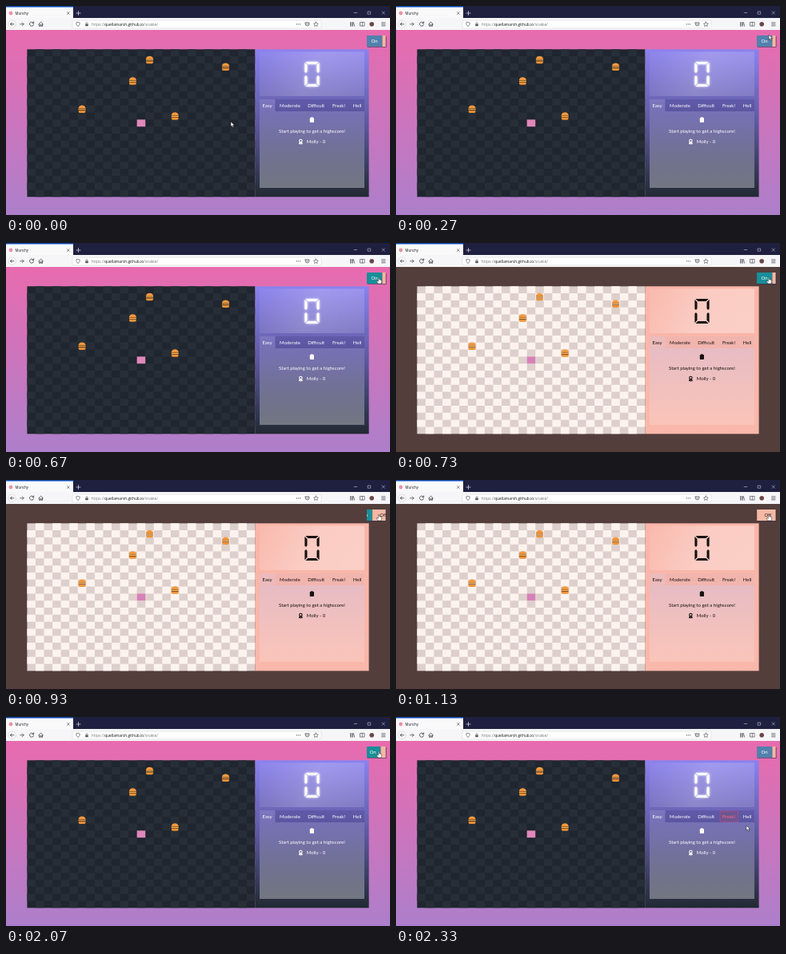
These frames come from a looping animation (480x262 px, 2390 ms). An HTML page:

```html
<!DOCTYPE html>
<html lang="en">
<head>
<meta charset="utf-8">
<title>Browser game theme toggle</title>
<style>
  html, body { margin: 0; width: 100%; height: 100%; overflow: hidden; background: #1f1f40; }
  svg { display: block; width: 100vw; height: 100vh; }
  .page { font: 6px Lato, sans-serif; }
  .chrome { font: 4.8px "Open Sans", "Noto Sans", sans-serif; }
  .tab { font-size: 4.4px; }
  .mid { text-anchor: middle; }
</style>
</head>
<body>
<svg id="stage" viewBox="0 0 480 262" preserveAspectRatio="none"></svg>
<script>
const LOOP = 2390, STEP = 1000 / 15;
const BOARD = { x: 26.4, y: 54.3, w: 285.1, h: 185, cols: 27, rows: 21 };
const CELL_W = BOARD.w / BOARD.cols, CELL_H = BOARD.h / BOARD.rows;
const FOOD = [[14, 1], [23, 2], [12, 4], [6, 8], [17, 9]];
const TABS = [['Easy', 326.5], ['Moderate', 355], ['Difficult', 387.7], ['Freak!', 416], ['Hell', 439]];

const THEMES = {
  dark: {
    page: ['#e86bae', '#ad7fcb'], cells: ['#1f262f', '#272e38'],
    panel: ['#8c82ee', '#5e599f', '#222933'], ink: '#fff', player: '#e087bb',
    score: ['#ffffff08', '#ffffff34', '#ffffff20'], content: ['#ffffff1c', '#ffffff58'],
    tabBar: '#46408a50', tabOn: '#ffffff1c'
  },
  light: {
    page: ['#533e3c', '#533e3c'], cells: ['#ddd0cc', '#fdf3ee'],
    panel: ['#f9b5a8', '#f9b6a9', '#f9b8ab'], ink: '#17110f', player: '#d681b8',
    score: ['#ffffff10', '#ffffff50', '#ffffff58'], content: ['#dfbfd0b0', '#fbcabfb0'],
    tabBar: '#eeb4b2a0', tabOn: '#e3bfcc90'
  }
};

const rect = (x, y, w, h, fill, extra = '') =>
  `<rect x="${x}" y="${y}" width="${w}" height="${h}" fill="${fill}" ${extra}/>`;
const path = (d, fill, extra = '') => `<path d="${d}" fill="${fill}" ${extra}/>`;
const line = (d, color, width = 0.8) =>
  path(d, 'none', `stroke="${color}" stroke-width="${width}" stroke-linecap="round" stroke-linejoin="round"`);
const dot = (x, y, r, fill) => `<circle cx="${x}" cy="${y}" r="${r}" fill="${fill}"/>`;
const text = (x, y, value, fill, extra = '') => `<text x="${x}" y="${y}" fill="${fill}" ${extra}>${value}</text>`;

function gradient(id, colors, [x1, y1, x2, y2]) {
  const stops = colors.map((c, i) => `<stop offset="${i / (colors.length - 1)}" stop-color="${c}"/>`);
  return `<linearGradient id="${id}" gradientUnits="userSpaceOnUse" x1="${x1}" y1="${y1}" x2="${x2}" y2="${y2}">${stops.join('')}</linearGradient>`;
}

function checker(fill) {
  let d = '';
  for (let row = 0; row < BOARD.rows; row++)
    for (let col = 1 - row % 2; col < BOARD.cols; col += 2)
      d += `M${(BOARD.x + col * CELL_W).toFixed(2)} ${(BOARD.y + row * CELL_H).toFixed(2)}h${CELL_W.toFixed(2)}v${CELL_H.toFixed(2)}h${-CELL_W.toFixed(2)}z`;
  return path(d, fill);
}

function burger([col, row]) {
  const x = BOARD.x + (col + 0.5) * CELL_W, y = BOARD.y + (row + 0.5) * CELL_H;
  return `<g transform="translate(${x} ${y})">` +
    path('M-4.6 -.6C-4.6 -6.2 4.6 -6.2 4.6 -.6z', '#f0943a') +
    rect(-4.5, -0.7, 9, 0.9, '#a9632c', 'rx=".4"') +
    rect(-4.7, 0.1, 9.4, 1, '#f8bd4c', 'rx=".5"') +
    rect(-4.5, 1, 9, 1.1, '#8c4a22', 'rx=".5"') +
    path('M-4.4 2H4.4V3Q4.3 4.8 2.8 4.8H-2.8Q-4.3 4.8 -4.4 3z', '#ee9336') +
    line('M-2.2 -3h.2M0 -3.6h.2M2 -2.9h.2', '#fbc27c', 0.6) + '</g>';
}

// Six beveled bars of a seven-segment zero.
function zero(color) {
  const upright = (x, y, side) =>
    path(`M${x} ${y}l${3.1 * side} 3v8l${-1.5 * side} 1.9l${-1.6 * side} -1.4z`, color);
  const top = path('M374.4 70h16.2l-3 3.1h-10.2z', color);
  const half = top + upright(373.4, 71.1, 1) + upright(391.6, 71.1, -1);
  return half + `<g transform="matrix(1 0 0 -1 0 171)">${half}</g>`;
}

function scene(name) {
  const t = THEMES[name], px = BOARD.x + 13 * CELL_W, py = BOARD.y + 10 * CELL_H;
  const dark = name === 'dark', url = part => `url(#${name}-${part})`;
  let out = '<defs>' +
    gradient(`${name}-page`, t.page, [0, 30, 0, 262]) +
    gradient(`${name}-panel`, t.panel, [0, 54, 0, 239]) +
    gradient(`${name}-score`, t.score, [317, 57, 448, 113]) +
    gradient(`${name}-content`, t.content, [0, 132, 0, 228]) + '</defs>';
  out += rect(0, 30, 480, 232, url('page')) +
    rect(BOARD.x, BOARD.y, BOARD.w, BOARD.h, t.cells[0]) + checker(t.cells[1]) +
    rect(px, py, CELL_W, CELL_H, t.player) +
    FOOD.map(burger).join('') +
    rect(BOARD.x + BOARD.w, BOARD.y, 142.1, BOARD.h, url('panel')) +
    rect(317, 57.3, 131, 55.7, url('score')) +
    (dark ? `<g filter="url(#glow)">${zero('#fff')}</g>` : '') + zero(t.ink) +
    rect(336.5, 117, 111.5, 15, t.tabBar) +
    rect(317, 117, 19.5, 15, t.tabOn) +
    rect(317, 132, 131, 96, url('content'));
  for (const [label, x] of TABS) out += text(x, 126.8, label, t.ink, 'class="mid"');
  out += rect(379.8, 140, 5.2, 5.9, t.ink, 'rx=".7"') + rect(381.2, 139.2, 2.4, 1.5, t.ink, 'rx=".5"') +
    text(382.4, 159, 'Start playing to get a highscore!', t.ink, 'class="mid"') +
    `<circle cx="368.4" cy="169" r="1.7" fill="none" stroke="${t.ink}" stroke-width="1.1"/>` +
    path('M366.8 170.6l-.9 2.7 1.6-.3.7.8.6-2.2zM370 170.6l.9 2.7-1.6-.3-.7.8-.6-2.2z', t.ink) +
    text(375.7, 172.2, 'Molly - 0', t.ink);
  return `<g id="${name}">${out}</g>`;
}

function chrome() {
  const ink = '#3b3b42', pale = '#e4e4ee';
  return '<g class="chrome">' +
    rect(0, 0, 480, 17, '#1f1f40') + rect(0, 1, 84, 15, '#f9f9fa') + rect(0, 0.3, 84, 1.2, '#0a5bd8') +
    rect(0, 15, 480, 15, '#f6f6f8') +
    dot(6, 9, 2.4, '#eb92a4') + text(11.6, 10.6, 'Munchy', '#17171c', 'class="tab"') +
    line('M76.4 7.7l2.8 2.8m0-2.8l-2.8 2.8', ink, 0.6) +
    line('M90.5 6.5v5m-2.5-2.5h5', pale, 0.7) +
    line('M435.2 8.5h3.6', pale, 0.5) + line('M452.5 7h3.2v3.2h-3.2z', pale, 0.5) +
    line('M470.1 6.9l3.3 3.3m0-3.3l-3.3 3.3', pale, 0.5) +
    '<circle cx="7.6" cy="22.7" r="4.7" fill="#fff" stroke="#bdbdc2" stroke-width=".5"/>' +
    line('M10 22.7H5.4m2-2l-2 2 2 2', ink) + line('M17.6 22.7h4.6m-2-2l2 2-2 2', '#55555c') +
    line('M34.4 21.3a2.6 2.6 0 1 0 .2 2.2M34.7 19.8v1.9h-1.9', ink) +
    line('M40.7 23l2.9-2.8 2.9 2.8M41.7 22.6v2.7h1.3v-1.7h1.2v1.7h1.3v-2.7', ink) +
    rect(83, 18, 311, 9.8, '#fff', 'rx="1" stroke="#c8c8cc" stroke-width=".4"') +
    line('M90 20.3l2.2.7c0 2.4-.7 3.6-2.2 4.5-1.5-.9-2.2-2.1-2.2-4.5z', ink, 0.6) +
    rect(99.2, 22.4, 3.6, 2.8, '#5d5d63', 'rx=".4"') + line('M100 22.4v-.8a1 1 0 0 1 2 0v.8', '#5d5d63', 0.6) +
    text(106.8, 24.6, '<tspan fill="#77777c">https://</tspan>quellamarsh.github.io<tspan fill="#77777c">/snakie/</tspan>', '#111') +
    [363.5, 365.5, 367.5].map(x => dot(x, 22.8, 0.6, ink)).join('') +
    line('M374.2 20.8h4.8v1.7a2.4 2.4 0 0 1-4.8 0zM375.5 22.2l1.1 1 1.1-1', ink, 0.7) +
    line('M387.4 20l.9 1.8 2 .3-1.5 1.4.4 2-1.8-1-1.8 1 .4-2-1.5-1.4 2-.3z', ink, 0.6) +
    line('M430.6 20.4v4.8m1.4-4.8v4.8m1.4-4.8v4.8m1-4.5l1.3 4.5', ink, 0.7) +
    line('M442.9 20.4h5.2v4.6h-5.2zM445.3 20.4V25', ink, 0.6) +
    dot(457.2, 22.7, 2.8, '#6b4646') + line('M469.6 20.8h4.4m-4.4 2h4.4m-4.4 2h4.4', ink, 0.7) + '</g>';
}

const stage = document.getElementById('stage');
stage.innerHTML = '<defs><clipPath id="switch"><rect x="451" y="37" width="23.6" height="14"/></clipPath>' +
  '<filter id="glow" x="-50%" y="-30%" width="200%" height="160%"><feGaussianBlur stdDeviation="1.6"/></filter></defs>' +
  `<g class="page">${scene('dark')}${scene('light')}` +
  '<g id="hot">' + rect(405, 118, 22.5, 13.2, '#6d568f', 'stroke="#f5447e" stroke-width=".6" stroke-dasharray="1.5 .8"') +
  text(416, 126.8, 'Freak!', '#ff6690', 'class="mid"') + '</g>' +
  rect(451.6, 37.8, 24, 14, '#2e2b45', 'opacity=".65"') +
  '<g clip-path="url(#switch)"><g id="slider">' +
  rect(451, 37, 19.2, 14, '#5281ad', 'id="onSide"') + text(460.6, 46.2, 'On', '#fff', 'class="mid"') +
  rect(470.2, 37, 28, 14, '#f4b9a4') + line('M470.2 37v14', '#7d6c70', 0.5) +
  text(484, 46.2, 'Off', '#2a2020', 'class="mid"') + '</g></g></g>' + chrome() +
  '<g id="arrow">' + path('M0 0v6.2l1.5-1.3 1 2.2 1.1-.5-1-2.1h2z', '#fff', 'stroke="#111" stroke-width=".5"') + '</g>' +
  '<g id="hand">' + path('M-.7 .5Q0 -.4 .7 .5V3Q1.8 2.5 2 3.3 3.4 2.9 3.6 4V5.6Q3.5 7 2.7 8H-.8L-2.8 5.2Q-2.8 4 -1.6 4.6L-.7 5.3z',
    '#fff', 'stroke="#222" stroke-width=".5"') + '</g>';

const parts = {};
for (const id of ['dark', 'light', 'hot', 'slider', 'onSide', 'arrow', 'hand']) parts[id] = document.getElementById(id);
const show = (el, on) => el.setAttribute('display', on ? 'inline' : 'none');
const clamp = v => Math.max(0, Math.min(1, v));
const ease = v => { const c = clamp(v); return c * c * (3 - 2 * c); };

// Pointer stops as [tick, x, y].
const TRACK = [[0, 281, 145], [1, 322, 122], [2, 387, 83], [3, 442, 50], [4, 466, 36], [6, 466, 43],
  [31, 466, 43], [32, 467, 56], [33, 470, 102], [34, 469, 153], [35, 438, 136]];

function pointer(tick) {
  const i = Math.max(1, TRACK.findIndex(p => p[0] >= tick));
  const [t0, x0, y0] = TRACK[i - 1], [t1, x1, y1] = TRACK[i];
  const f = (tick - t0) / (t1 - t0);
  return [x0 + (x1 - x0) * f, y0 + (y1 - y0) * f];
}

function mix(a, b, f) {
  return `rgb(${a.map((v, i) => Math.round(v + (b[i] - v) * f)).join()})`;
}

function render(ms) {
  const tick = Math.min(35, Math.floor((ms % LOOP + 4) / STEP));
  const light = tick >= 11 && tick < 27;
  const hovering = tick >= 5 && tick < 32;
  show(parts.dark, !light);
  show(parts.light, light);
  show(parts.hot, tick === 35);

  const off = ease((tick - 11) / 5) - ease((tick - 27) / 5);
  parts.slider.setAttribute('transform', `translate(${-19.2 * off} 0)`);
  const hover = clamp((tick - 4) / 3) - clamp((tick - 32) / 3);
  parts.onSide.setAttribute('fill', mix([82, 129, 173], [24, 143, 153], hover));

  const [x, y] = pointer(tick);
  for (const el of [parts.arrow, parts.hand]) el.setAttribute('transform', `translate(${x} ${y})`);
  show(parts.hand, hovering);
  show(parts.arrow, !hovering);
}

const start = performance.now();
function loop() {
  render(performance.now() - start);
  requestAnimationFrame(loop);
}
loop();
</script>
</body>
</html>
```
